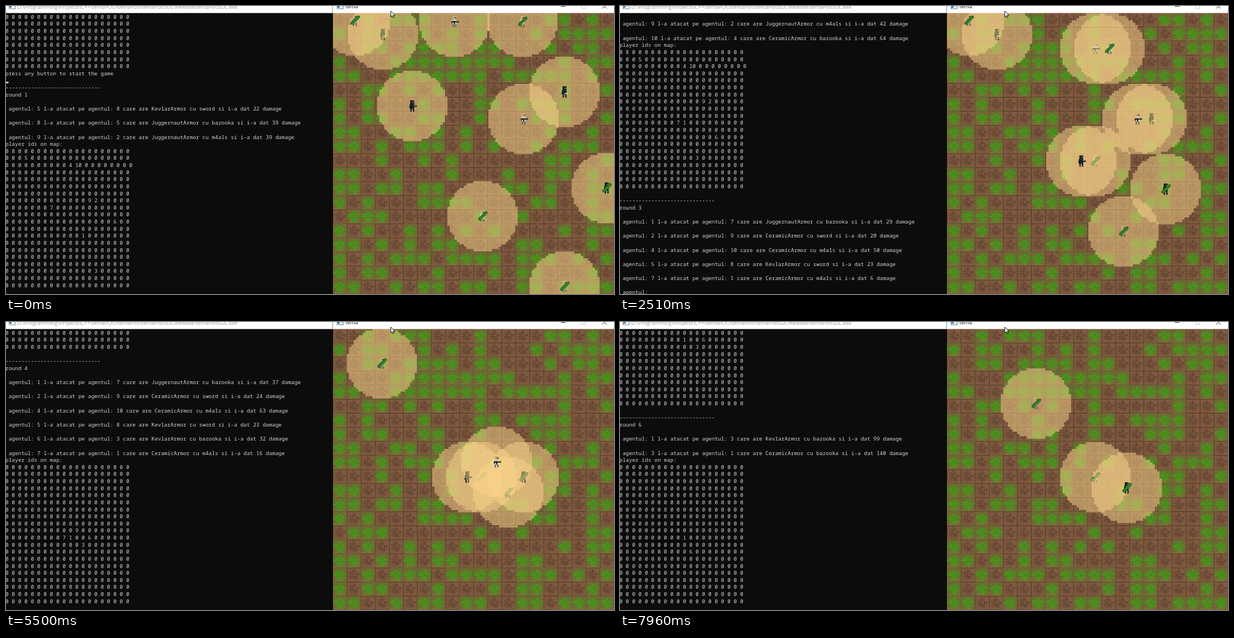
Recreate the animation shown at these times as an HTML page with a canvas. Size 1088 by 515 pixels, loop 8000 ms.

```html
<!DOCTYPE html>
<html lang="ro">
<head>
<meta charset="utf-8">
<title>tema</title>
<style>
  html, body { margin: 0; width: 100%; height: 100%; overflow: hidden; background: #0c0c0c; }
  canvas { display: block; }
</style>
</head>
<body>
<canvas id="stage" width="1088" height="515"></canvas>
<script>
const ctx = document.getElementById('stage').getContext('2d', { alpha: false });
const LOOP = 8000, LEFT = 585, TOP = 12, CELL = 25.15, SPEED = 0.045;
const ROW = 12.63;

// Times at which each round is printed and at which its moves begin.
const printAt = [-45, 50, 2510, 4380, 5880, 7530];
const moveAt = [-45, 50, 2580, 4430, 5938, 7530];

// Moves per round: two cells along a diagonal, '.' stays; the path ends with the agent.
const DIRS = { a: [-2, -2], b: [2, -2], c: [2, 2], d: [-2, 2], '.': [0, 0] };
const agent = (id, col, row, path, armor, weapon) => {
  const stops = [[col, row]];
  for (const d of path) {
    const [x, y] = stops[stops.length - 1];
    stops.push([x + DIRS[d][0], y + DIRS[d][1]]);
  }
  return { id, stops, rounds: path.length, armor, weapon };
};
const agents = [
  agent(1, 10, 14, 'ba....', 'Ceramic', 'bazooka'),
  agent(2, 16, 5, 'd..', 'Juggernaut', 'sword'),
  agent(3, 16, 19, 'aaab.', 'Kevlar', 'bazooka'),
  agent(4, 8, 0, 'c..', 'Ceramic', 'm4a1s'),
  agent(5, 3, 1, '...', 'Juggernaut', 'sword'),
  agent(6, 19, 12, 'ada..d', 'Juggernaut', 'bazooka'),
  agent(7, 5, 6, 'cc..', 'Juggernaut', 'm4a1s'),
  agent(8, 1, 0, '...ccc', 'Kevlar', 'bazooka'),
  agent(9, 13, 7, '...d', 'Ceramic', 'm4a1s'),
  agent(10, 13, 0, 'd..', 'Ceramic', 'bazooka'),
];

// Attacker, victim, damage.
const fights = [
  '5 8 22,8 5 39,9 2 39',
  '2 9 9,4 10 19,5 8 23,8 5 49,9 2 42,10 4 64',
  '1 7 29,2 9 20,4 10 50,5 8 23,7 1 6,8 5 60,9 2 45,10 4 93',
  '1 7 37,2 9 24,4 10 63,5 8 23,6 3 32,7 1 16',
  '1 7 45,3 9 147,6 9 37,7 9 23,9 3 43',
  '1 3 99,3 1 140',
];

const ground = [
  '..#.###...#....##.#.', '#.##..#.#.#...#.####', '..##.####.##...#.##.', '#...#########...#.##',
  '##..#######.#####.#.', '..##.#.#..#.....#..#', '#.#...#...##.####...', '#.##..##..#...###..#',
  '##..##.#.#.....#..#.', '##.#.###.#.#..#.###.', '...#..#.#......##..#', '##..#...#...#..##.#.',
  '##.##.##....##.#..##', '#.#...####....##..#.', '.###......#..#....##', '#.#..#.#.#.#....#.##',
  '##.#.#.##....##...#.', '#.#.###.####.###.#.#', '#.##...#...#.##...#.', '##..#.##.##..##.####',
];

const log = Array(8).fill('0 '.repeat(20));
const ends = [];
log.push('press any button to start the game');
fights.forEach((list, k) => {
  log.push('', '-'.repeat(30), 'round ' + (k + 1));
  for (const hit of list.split(',')) {
    const [from, to, damage] = hit.split(' ');
    log.push('', ` agentul: ${from} l-a atacat pe agentul: ${to} care are ${agents[to - 1].armor}Armor` +
      ` cu ${agents[from - 1].weapon} si i-a dat ${damage} damage`);
  }
  log.push('player ids on map:');
  const grid = Array.from({ length: 20 }, () => Array(20).fill(0));
  for (const a of agents) {
    if (k < a.rounds) {
      const [x, y] = a.stops[k + 1];
      grid[y][x] = a.id;
    }
  }
  log.push(...grid.map(r => r.join(' ')));
  ends.push(log.length);
});

function rect(g, color, x, y, w, h) {
  g.fillStyle = color;
  g.fillRect(x, y, w, h);
}

function line(g, color, width, ...pts) {
  g.strokeStyle = color;
  g.lineWidth = width;
  g.beginPath();
  for (let i = 0; i < pts.length; i += 2) g.lineTo(pts[i], pts[i + 1]);
  g.stroke();
}

function drawTile(g, x, y, bush) {
  let seed = 7;
  const rnd = (a, b) => {
    seed = (seed * 16807) % 2147483647;
    return a + (b - a) * seed / 2147483647;
  };
  const rays = (n, colors, width, inner, outer) => {
    for (let i = 0; i < n; i++) {
      const a = i / n * Math.PI * 2 + rnd(-0.2, 0.2), r0 = rnd(0, inner), r1 = rnd(outer * 0.65, outer);
      const c = Math.cos(a), s = Math.sin(a);
      line(g, colors[i % colors.length], width, c * r0, s * r0, c * r1, s * r1);
    }
  };
  g.save();
  g.translate(x + CELL / 2, y + CELL / 2);
  rect(g, bush ? '#7a6238' : '#7f583f', -CELL / 2, -CELL / 2, CELL + 0.5, CELL + 0.5);
  for (let i = 0; i < 30; i++) {
    rect(g, i % 2 ? '#70503a' : '#8a6247', rnd(-12, 11), rnd(-12, 11), 1.5, 1.5);
  }
  if (bush) {
    rays(22, ['#4d8a20', '#468420', '#55901f'], 3, 3, 12);
    for (let i = 0; i < 6; i++) rect(g, '#a8744a', rnd(-10, 10), rnd(8, 10.5), 1.5, 1.5);
  } else {
    rays(30, ['#58402d', '#654733'], 0.9, 5, 11);
  }
  g.strokeStyle = bush ? '#47742a' : '#57402c';
  g.lineWidth = 1;
  g.strokeRect(-CELL / 2 + 0.5, -CELL / 2 + 0.5, CELL - 0.5, CELL - 0.5);
  g.restore();
}

const map = document.createElement('canvas');
map.width = map.height = 503;
ground.forEach((r, y) => [...r].forEach((c, x) => drawTile(map.getContext('2d'), x * CELL, y * CELL, c === '#')));

// Blocky sight disc, 30 texels across.
const disc = new Path2D();
for (let i = 0; i < 30; i++) {
  const p = CELL / 6, y = i - 14.5, half = Math.round(Math.sqrt(225 - y * y));
  disc.rect(-half * p, (i - 15) * p, half * 2 * p, p);
}

function drawFigure({ armor, weapon }) {
  const dark = armor === 'Juggernaut';
  const coat = dark ? '#172326' : armor === 'Kevlar' ? '#a5a48c' : '#c9c9bd';
  const legs = dark ? '#172326' : '#6f6e60';
  rect(ctx, dark ? '#111a1c' : '#c9ad79', -3.5, -10, 7, 6);
  rect(ctx, dark ? '#7b8984' : '#30302a', 0, -7.5, 3.5, 1.5);
  rect(ctx, coat, -4.5, -4, 8, 9);
  rect(ctx, dark ? '#0d1416' : '#56564c', -5, 0, 2, 4);
  rect(ctx, legs, -3.5, 5, 2.5, 5);
  rect(ctx, legs, 1, 5, 2.5, 5);
  if (weapon === 'bazooka') {
    ctx.lineCap = 'round';
    line(ctx, '#1c4f18', 5.5, -5, 5, 6, -6);
    line(ctx, '#3c942c', 3.8, -5, 5, 6, -6);
    line(ctx, '#1c4f18', 1, -7, 6.5, 8, -8);
    ctx.lineCap = 'butt';
  } else if (weapon === 'm4a1s') {
    rect(ctx, '#1b2022', -5, -1, 13, 2.5);
    rect(ctx, '#1b2022', -1, 1, 2, 4);
    rect(ctx, '#6c7778', 2, -1, 4, 1);
  } else {
    rect(ctx, '#d8d8c8', 0, 2, 6, 1.8);
    rect(ctx, '#5b4630', -2, 1.5, 2, 3);
  }
}

function place(a, t) {
  let pos = a.stops[0];
  for (let k = 0; k < a.rounds && moveAt[k] <= t; k++) {
    const reach = SPEED * (Math.min(t, moveAt[k + 1] ?? LOOP) - moveAt[k]) / CELL;
    pos = pos.map((p, i) => {
      const d = a.stops[k + 1][i] - p;
      return p + Math.sign(d) * Math.min(Math.abs(d), reach);
    });
  }
  return pos;
}

function drawGame(t) {
  ctx.save();
  ctx.beginPath();
  ctx.rect(LEFT, TOP, 503, 503);
  ctx.clip();
  ctx.drawImage(map, LEFT, TOP);
  const round = moveAt.filter(m => m <= t).length - 1;
  for (const a of agents) {
    if (round >= a.rounds) continue;
    const [x, y] = place(a, t);
    ctx.save();
    ctx.translate(LEFT + x * CELL + 14.2, TOP + y * CELL + 13.8);
    ctx.fillStyle = 'rgba(252,214,140,0.5)';
    ctx.fill(disc);
    drawFigure(a);
    ctx.restore();
  }
  ctx.restore();
}

function drawConsole(t) {
  rect(ctx, '#0c0c0c', 0, TOP, LEFT, 503);
  const k = printAt.filter(p => p <= t).length - 1;
  const partial = t < moveAt[k];
  const end = partial ? ends[k - 1] + 15 : ends[k];
  const rows = partial ? 40 : 39;
  ctx.font = '9.48px "Noto Sans Mono", monospace';
  ctx.fillStyle = '#d2d2d2';
  for (let i = 0; i < rows; i++) {
    const text = log[end - rows + i];
    ctx.fillText(partial && i === 39 ? text.slice(0, 9) : text, -1, 22.8 + i * ROW);
  }
  if (k === 0) rect(ctx, '#f2f2f2', 0, 135.5, 4.5, 2.5);
}

function drawTitles() {
  rect(ctx, '#ffffff', 0, 0, 1088, TOP + 0.6);
  rect(ctx, '#5f9aa6', 584, 0, 1, TOP);
  for (const x of [5, 592]) {
    rect(ctx, '#76848e', x, -3, 12, 8.5);
    rect(ctx, x > 5 ? '#d9ecf7' : '#f4f6f7', x + 1, 0, 10, 4.5);
    rect(ctx, '#3f7fae', x + 1, 0, 4, 3);
  }
  ctx.font = '9.4px "Open Sans", sans-serif';
  ctx.fillStyle = '#999999';
  ctx.fillText('D:\\Programming\\Projects\\C++\\temaPOO\\temaPoo\\temaPooSDL\\Release\\temaPooSDL.exe', 20, 4.6);
  ctx.fillStyle = '#111111';
  ctx.fillText('tema', 607.5, 4.4);
  rect(ctx, '#222222', 993, 0, 8, 1);
  line(ctx, '#cccccc', 1, 1030.5, 0, 1030.5, 4.5, 1037.5, 4.5, 1037.5, 0);
  line(ctx, '#222222', 1, 1067, 4.5, 1071, 0.5, 1075, 4.5);
}

function drawPointer() {
  ctx.beginPath();
  [[0, 0], [0, 10.5], [2.4, 8.3], [4, 12], [5.6, 11.3], [4, 7.7], [7.3, 7.6]]
    .forEach(([x, y]) => ctx.lineTo(688.7 + x, 9 + y));
  ctx.closePath();
  ctx.fillStyle = '#ffffff';
  ctx.fill();
  ctx.strokeStyle = '#000000';
  ctx.lineWidth = 0.9;
  ctx.stroke();
}

function frame() {
  const t = performance.now() % LOOP;
  drawConsole(t);
  drawGame(t);
  drawTitles();
  drawPointer();
  requestAnimationFrame(frame);
}
frame();
</script>
</body>
</html>
```
